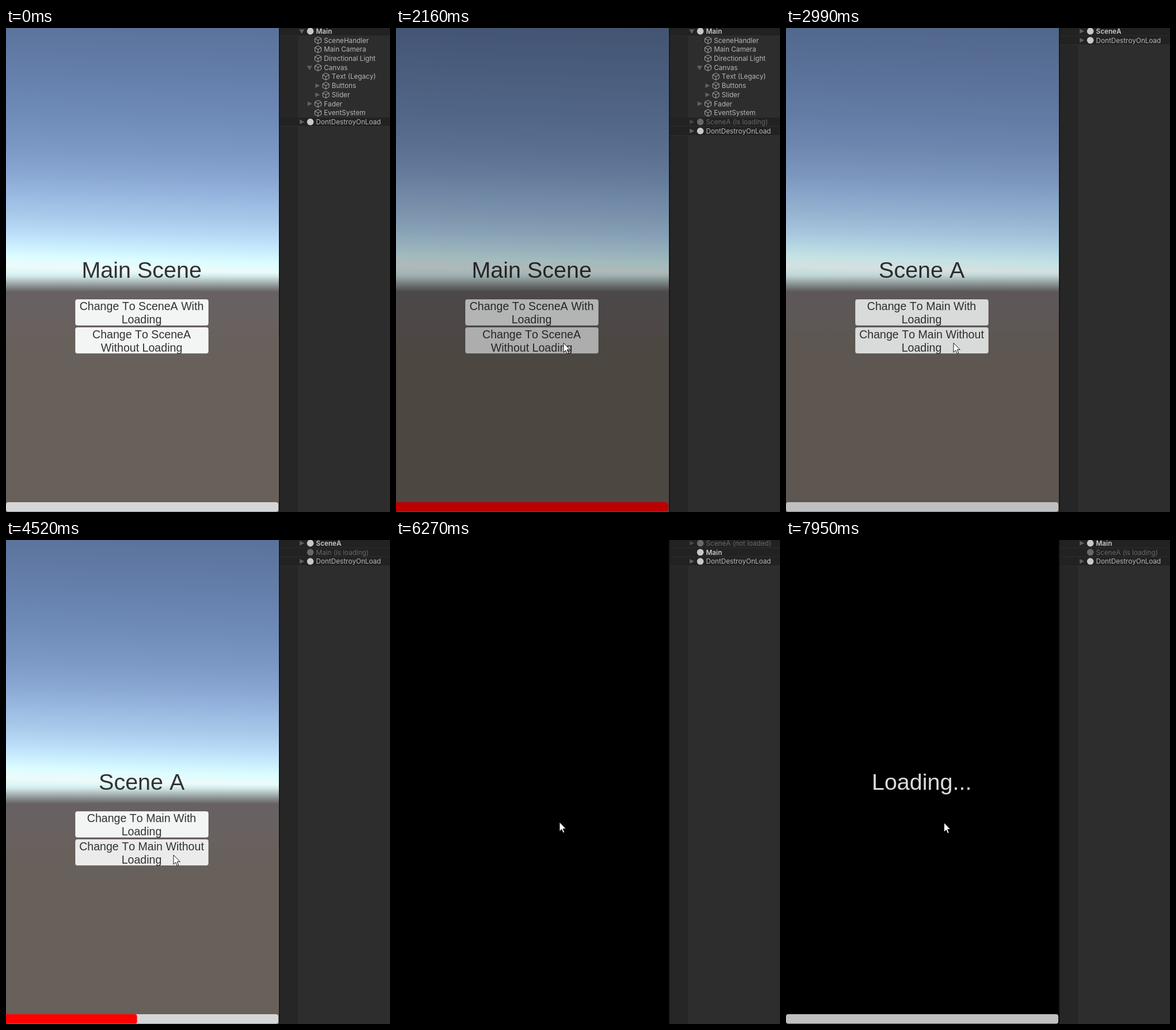
Write an HTML page that moves like this. It is 667 by 839 pixels and loops after 8000 ms.

```html
<!DOCTYPE html>
<html lang="en">
<head>
<meta charset="utf-8">
<title>Scene switch</title>
<style>
html, body { margin: 0; width: 100%; height: 100%; overflow: hidden; background: #2d2d2d; }
svg { display: block; }
text { font-kerning: none; }
.ui { font-family: "Liberation Sans", Arial, sans-serif; fill: #323232; text-anchor: middle; }
.title { font-size: 39.5px; }
.label { font-size: 19.6px; }
.button { stroke: #000; stroke-opacity: .32; }
#rows { font: 11.7px Inter, sans-serif; fill: #b6b6b6; }
#rows .active { font-weight: 600; fill: #cacaca; }
#rows .dim { fill: #686868; }
.arrow { fill: #626262; }
.dim .arrow { fill: #484848; }
.cube { fill: none; stroke: #ababab; stroke-width: 1; stroke-linejoin: round; }
</style>
</head>
<body>
<svg width="667" height="839" viewBox="0 0 667 839">
  <defs>
    <linearGradient id="sky" gradientUnits="userSpaceOnUse" x1="237" y1="0" x2="224" y2="457">
      <stop offset="0" stop-color="#5b739c"/>
      <stop offset=".17" stop-color="#647eaa"/>
      <stop offset=".34" stop-color="#6f8bb8"/>
      <stop offset=".46" stop-color="#7b97c4"/>
      <stop offset=".57" stop-color="#8aa8d3"/>
      <stop offset=".65" stop-color="#9abae2"/>
      <stop offset=".72" stop-color="#a9c9ea"/>
      <stop offset=".78" stop-color="#b8daf6"/>
      <stop offset=".83" stop-color="#c8ecfd"/>
      <stop offset=".88" stop-color="#dcfdff"/>
      <stop offset=".915" stop-color="#eefafa"/>
      <stop offset=".94" stop-color="#def6f6"/>
    </linearGradient>
    <linearGradient id="horizon" gradientUnits="userSpaceOnUse" x1="0" y1="422" x2="0" y2="458">
      <stop offset="0" stop-color="#def6f6" stop-opacity="0"/>
      <stop offset=".25" stop-color="#d0e6e6"/>
      <stop offset=".5" stop-color="#abb7b7"/>
      <stop offset=".75" stop-color="#858a8a"/>
      <stop offset=".95" stop-color="#6c6768"/>
      <stop offset="1" stop-color="#686163"/>
    </linearGradient>
    <linearGradient id="ground" gradientUnits="userSpaceOnUse" x1="0" y1="457" x2="0" y2="545">
      <stop offset="0" stop-color="#686163"/>
      <stop offset=".75" stop-color="#68615f"/>
      <stop offset="1" stop-color="#68605a"/>
    </linearGradient>
    <clipPath id="view"><rect width="474" height="839"/></clipPath>
    <path id="cube" class="cube" d="M0-6 5.5-3V3L0 6-5.5 3V-3ZM-5.5-3 0 0 5.5-3M0 0V6"/>
  </defs>

  <g clip-path="url(#view)">
    <rect width="474" height="839" fill="#000"/>
    <g id="world">
      <rect width="474" height="458" fill="url(#sky)"/>
      <rect y="422" width="474" height="36" fill="url(#horizon)"/>
      <path d="M0 458Q237 453 474 458V839H0Z" fill="url(#ground)"/>
      <rect id="top" class="button" x="120" y="470" width="232" height="46" rx="4"/>
      <rect id="bottom" class="button" x="120" y="518.5" width="232" height="46" rx="4"/>
      <g class="ui label">
        <text id="a1" x="235.5" y="489"/>
        <text x="235.5" y="511.5">Loading</text>
        <text id="b1" x="235.5" y="538"/>
        <text id="b2" x="235.5" y="560.5"/>
      </g>
    </g>
    <text id="title" class="ui title" x="235.7" y="433"/>
    <rect x="0" y="822" width="473" height="16.5" rx="4" fill="#d6d6d6"/>
    <rect id="fill" x="-6" y="822" height="16.5" rx="4" fill="#f00"/>
    <rect id="fade" width="474" height="839"/>
  </g>

  <rect x="474" width="2" height="839" fill="#191919"/>
  <rect x="476" width="31" height="839" fill="#262626"/>
  <rect x="507" width="160" height="839" fill="#2d2d2d"/>
  <g id="rows"></g>

  <path id="cursor" d="M0 0V16.2L3.7 12.7 6.3 18.6 8.8 17.5 6.2 11.7H11.3Z" fill="#fff" stroke="#000" stroke-width=".9"/>
</svg>
<script>
const LOOP = 8000;
const $ = id => document.getElementById(id);
const clamp = x => Math.max(0, Math.min(1, x));
const set = (id, attrs) => { for (const k in attrs) $(id).setAttribute(k, attrs[k]); };
const say = (id, s) => { if ($(id).textContent !== s) $(id).textContent = s; };

// Hierarchy rows: [label, depth, arrow, style]
const scene = (name, arrow = 'right') => [name, 0, arrow, 'active'];
const ghost = (name, arrow = '') => [name, 0, arrow, 'dim'];
const keep = ['DontDestroyOnLoad', 0, 'right', 'plain'];
const mainTree = [
  scene('Main', 'down'),
  ['SceneHandler', 1], ['Main Camera', 1], ['Directional Light', 1],
  ['Canvas', 1, 'down'], ['Text (Legacy)', 2], ['Buttons', 2, 'right'], ['Slider', 2, 'right'],
  ['Fader', 1, 'right'], ['EventSystem', 1]
];
const panels = [
  [0, [...mainTree, keep]],
  [880, [...mainTree, ghost('SceneA (is loading)', 'right'), keep]],
  [2640, [scene('SceneA'), keep]],
  [3540, [scene('SceneA'), ghost('Main (is loading)'), keep]],
  [6260, [ghost('SceneA (not loaded)', 'right'), scene('Main', ''), keep]],
  [6400, [scene('Main'), keep]],
  [7530, [scene('Main'), ghost('SceneA (is loading)'), keep]]
];
const arrows = { right: 'M-3.5-4 4.5 0-3.5 4Z', down: 'M-4.5-3H4.5L0 4.5Z' };

function rowMarkup([label, depth, arrow, style = ''], i) {
  const y = 5.6 + 15.72 * i, dx = 13.6 * depth;
  const bar = depth ? '' : `<rect x="476" y="${y - 7.5}" width="191" height="15" fill="#222"/>
    <path d="M476 ${y + 7.8}H667" stroke="#353330" stroke-width=".8"/>`;
  const icon = depth
    ? `<use href="#cube" x="${528.4 + dx}" y="${y}"/>`
    : `<circle cx="528.6" cy="${y}" r="5.8" fill="${style === 'dim' ? '#686868' : '#c8c8c8'}"/>`;
  const tip = arrow ? `<path class="arrow" transform="translate(${513.7 + dx} ${y})" d="${arrows[arrow]}"/>` : '';
  return `<g class="${style}">${bar}${tip}${icon}<text x="${538.6 + dx}" y="${y + 4.2}">${label}</text></g>`;
}

let shown = -1;
function drawPanel(t) {
  const i = panels.findLastIndex(p => t >= p[0]);
  if (i === shown) return;
  shown = i;
  $('rows').innerHTML = panels[i][1].map(rowMarkup).join('');
}

function tick(t) {
  const from = (start, last) => Math.min(last, start + Math.floor((t - start) / 70) * 70);
  if (t < 200) return 0;
  if (t < 2640) return from(200, 2440);
  if (t < 3400) return from(2640, 3130);
  return from(3400, 7950);
}

// Half-second fades: [start, direction]; blended in linear light
const fades = [[1917, 1], [2600, -1], [5755, 1], [6420, -1], [7035, 1], [7562, -1]];
function darkness(t) {
  const f = fades.findLast(f => t >= f[0]);
  if (!f) return 0;
  const p = clamp((t - f[0]) / 500);
  return 1 - (f[1] > 0 ? 1 - p : p) ** (1 / 2.2);
}

function progress(t) {
  if (t < 2600) return clamp((t - 883) / 1035);
  return t < 6260 ? clamp((t - 3535) / 2047) : 0;
}

// Cursor keys: [time, x, y]
const path = [[200, 345, 845], [760, 291, 546], [5850, 291, 546], [6250, 284, 489], [6480, 284, 489], [6760, 274.5, 490]];
function cursorAt(t) {
  const i = path.findLastIndex(k => t >= k[0]);
  if (i < 0) return [0, -50];
  const a = path[i], b = path[i + 1] || a;
  const p = clamp((t - a[0]) / (b[0] - a[0] || 1)), e = p * p * (3 - 2 * p);
  return [a[1] + (b[1] - a[1]) * e, a[2] + (b[2] - a[2]) * e];
}

const between = (t, a, b) => t >= a && t < b;
const NORMAL = '#f3f5f4', PRESSED = '#c8c8c8', SELECTED = '#ebebeb';
function bottomTint(t) {
  if (between(t, 760, 870) || between(t, 3400, 3530)) return PRESSED;
  return between(t, 870, 2600) || between(t, 3530, 6260) ? SELECTED : NORMAL;
}

function draw(now) {
  const t = tick(now % LOOP);
  const inA = between(t, 2600, 6400), loading = t >= 7550;
  const target = inA ? 'Main' : 'SceneA';
  $('world').style.display = loading ? 'none' : '';
  say('title', loading ? 'Loading...' : inA ? 'Scene A' : 'Main Scene');
  $('title').style.fill = loading ? '#f5f5f5' : '';
  say('a1', `Change To ${target} With`);
  say('b1', `Change To ${target}` + (inA ? ' Without' : ''));
  say('b2', inA ? 'Loading' : 'Without Loading');
  set('top', { fill: t >= 7000 ? PRESSED : NORMAL });
  set('bottom', { fill: bottomTint(t) });
  const p = progress(t);
  set('fill', { width: p ? 6 + 473 * p : 0 });
  set('fade', { opacity: darkness(t) });
  set('cursor', { transform: `translate(${cursorAt(t)})` });
  drawPanel(t);
}

const start = performance.now();
function loop() {
  draw(performance.now() - start);
  requestAnimationFrame(loop);
}
loop();
</script>
</body>
</html>
```
